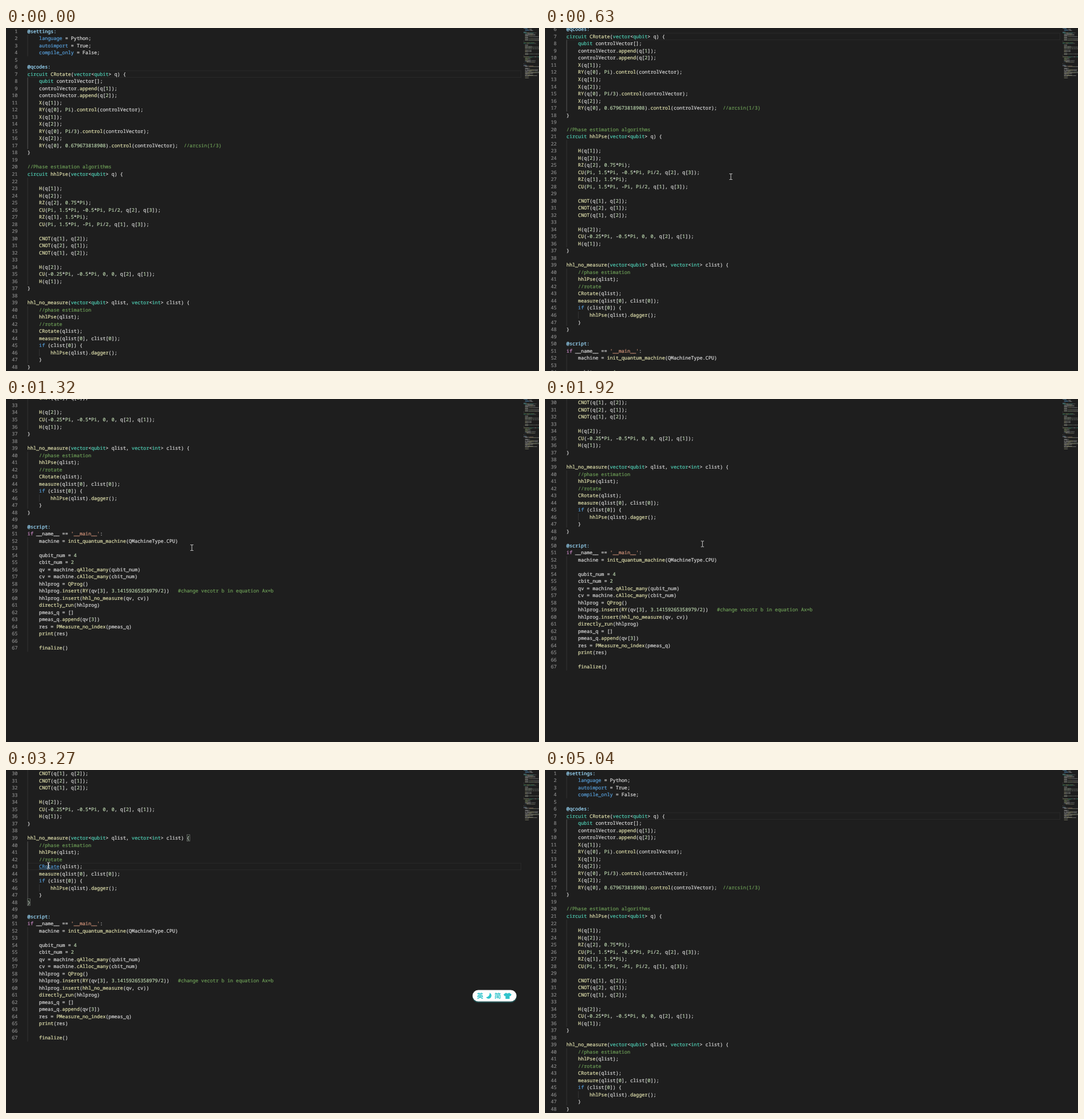
An HTML page that plays this animation: 932x601 px, repeating every 5.1 s.

```html
<!DOCTYPE html>
<html lang="en">
<head>
<meta charset="utf-8">
<title>Quantum code editor</title>
<style>
html, body { margin: 0; width: 100%; height: 100%; overflow: hidden; background: #1e1e1e; }
svg { display: block; width: 932px; height: 601px; }
text { white-space: pre; text-rendering: geometricPrecision; }
.code { font: 8.45px "Noto Sans Mono", monospace; stroke-width: 0.24px; }
.ime { font: bold 11.5px "Noto Sans CJK SC", "Noto Sans CJK", sans-serif; text-anchor: middle; }
</style>
</head>
<body>
<svg id="stage" viewBox="0 0 932 601"></svg>
<script>
const source = `@settings:
    language = Python;
    autoimport = True;
    compile_only = False;

@qcodes:
circuit CRotate(vector<qubit> q) {
    qubit controlVector[];
    controlVector.append(q[1]);
    controlVector.append(q[2]);
    X(q[1]);
    RY(q[0], Pi).control(controlVector);
    X(q[1]);
    X(q[2]);
    RY(q[0], Pi/3).control(controlVector);
    X(q[2]);
    RY(q[0], 0.679673818908).control(controlVector);  //arcsin(1/3)
}

//Phase estimation algorithms
circuit hhlPse(vector<qubit> q) {

    H(q[1]);
    H(q[2]);
    RZ(q[2], 0.75*Pi);
    CU(Pi, 1.5*Pi, -0.5*Pi, Pi/2, q[2], q[3]);
    RZ(q[1], 1.5*Pi);
    CU(Pi, 1.5*Pi, -Pi, Pi/2, q[1], q[3]);

    CNOT(q[1], q[2]);
    CNOT(q[2], q[1]);
    CNOT(q[1], q[2]);

    H(q[2]);
    CU(-0.25*Pi, -0.5*Pi, 0, 0, q[2], q[1]);
    H(q[1]);
}

hhl_no_measure(vector<qubit> qlist, vector<int> clist) {
    //phase estimation
    hhlPse(qlist);
    //rotate
    CRotate(qlist);
    measure(qlist[0], clist[0]);
    if (clist[0]) {
        hhlPse(qlist).dagger();
    }
}

@script:
if __name__ == '__main__':
    machine = init_quantum_machine(QMachineType.CPU)

    qubit_num = 4
    cbit_num = 2
    qv = machine.qAlloc_many(qubit_num)
    cv = machine.cAlloc_many(cbit_num)
    hhlprog = QProg()
    hhlprog.insert(RY(qv[3], 3.14159265358979/2))   #change vecotr b in equation Ax=b
    hhlprog.insert(hhl_no_measure(qv, cv))
    directly_run(hhlprog)
    pmeas_q = []
    pmeas_q.append(qv[3])
    res = PMeasure_no_index(pmeas_q)
    print(res)

    finalize()`.split("\n");

const LOOP = 5100, CHAR = 5.07, ROW = 12.515, LEFT = 37.6;
const NOTCH = ROW * 50 / 19; // one wheel notch: 50 px at a 19 px line height
const NS = "http://www.w3.org/2000/svg";
const stage = document.getElementById("stage");
const rowTop = n => (n - 1) * ROW - 0.6;
const colX = c => LEFT + c * CHAR;

function add(parent, tag, attrs, content) {
  const el = document.createElementNS(NS, tag);
  for (const k in attrs) el.setAttribute(k, attrs[k]);
  if (content !== undefined) el.textContent = content;
  return parent.appendChild(el);
}
const show = (el, on) => el.setAttribute("visibility", on ? "visible" : "hidden");

function ink(el, color) {
  el.setAttribute("fill", color);
  el.setAttribute("stroke", color);
}

// Syntax colours, first match wins
const rules = [
  [/^(\/\/|#).*/, "#6a9955"],
  [/^'[^']*'/, "#ce9178"],
  [/^@\w+:/, "#9cdcfe"],
  [/^(language|autoimport|compile_only)\b/, "#569cd6"],
  [/^(circuit|vector|qubit|int)\b/, "#4ec9b0"],
  [/^if\b/, "#569cd6"],
  [/^\w+(?=\()/, "#dcdcaa"],
  [/^(\d+(\.\d+)?|Pi\b)/, "#b5cea8"],
  [/^(\w+|\s+|.)/, "#d4d4d4"]
];

function tokens(line, n) {
  const list = [];
  for (let at = 0; at < line.length;) {
    const rest = line.slice(at);
    const [re, base] = rules.find(r => r[0].test(rest));
    const text = rest.match(re)[0];
    list.push({ text, at, color: text === "if" && n > 50 ? "#c586c0" : base });
    at += text.length;
  }
  return list;
}

// Editor document
const doc = add(stage, "g", {});
const highlight = add(doc, "rect", { x: LEFT, width: 863, height: ROW - 0.8, fill: "none", stroke: "#2b2b2b", "stroke-width": 0.9 });

function guide(col, from, to, color = "#404040") {
  return add(doc, "rect", { x: colX(col), y: rowTop(from), width: 0.7, height: (to - from + 1) * ROW, fill: color });
}
guide(0, 2, 4);
guide(0, 22, 36);
guide(0, 52, 67);
guide(4, 46, 46);
const guideTop = guide(0, 8, 17);
const guideLow = guide(0, 40, 47);

const brackets = add(doc, "g", { fill: "#1b251b", stroke: "#888", "stroke-width": 0.6 });
for (const [row, col] of [[39, 55], [48, 0]])
  add(brackets, "rect", { x: colX(col), y: rowTop(row) + 0.5, width: CHAR, height: ROW - 1 });

const mini = add(stage, "g", { opacity: 0.55 });
let link;

source.forEach((line, i) => {
  const n = i + 1, y = rowTop(n) + 9.3;
  add(doc, "text", { class: "code", x: 20.4, y, "text-anchor": "end", fill: "#858585", stroke: "#858585" }, n);
  const row = add(doc, "text", { class: "code", x: LEFT, y });
  for (const tk of tokens(line, n)) {
    const span = add(row, "tspan", {}, tk.text);
    ink(span, tk.color);
    if (n === 43 && tk.text === "CRotate") link = span;
    for (const word of tk.text.matchAll(/\S+/g)) {
      const x = 905 + (tk.at + word.index) * 0.66;
      if (x < 932) add(mini, "rect", { x, y: i * 1.317 + 0.2, width: word[0].length * 0.66, height: 0.8, fill: tk.color });
    }
  }
});
const underline = add(doc, "rect", { x: colX(4), y: rowTop(43) + 10.3, width: 7 * CHAR, height: 0.7, fill: "#4e94ce" });
const caret = add(doc, "rect", { width: 0.9, height: ROW - 0.5, fill: "#aeafad" });

// Input method bar
const ime = add(stage, "g", {});
add(ime, "rect", { x: 815.5, y: 387, width: 77.5, height: 20.5, rx: 10.2, fill: "#2cc5cb", opacity: 0.3 });
add(ime, "rect", { x: 815.8, y: 385.6, width: 76.8, height: 19.8, rx: 9.9, fill: "#fff" });
const teal = add(ime, "g", { fill: "#2fc3cb" });
add(teal, "text", { class: "ime", x: 829, y: 399.8 }, "英");
add(teal, "text", { class: "ime", x: 859.7, y: 399.8 }, "简");
add(teal, "path", { d: "M845.6 390.6A5.2 5.2 0 1 1 839.4 398.3A6.6 6.6 0 0 0 845.6 390.6Z" });
add(teal, "path", { d: "M874.4 390.3Q877 392.8 879.6 390.3L884 393.2L882 396.4L880.6 395.8V401H873.4V395.8L872 396.4L870 393.2Z" });

// Mouse pointers
const beam = add(stage, "path", { d: "M-2.6 -5H-.7L0 -4.5L.7 -5H2.6M0 -4.5V4.5M-2.6 5H-.7L0 4.5L.7 5H2.6", fill: "none", stroke: "#e4e4e4", "stroke-width": 0.9 });
const hand = add(stage, "path", { d: "M-1.4 -5.5Q-.5 -7 .4 -5.5V-1.8L3.6 -1Q5 -.6 4.8 1L4 4.5V6.6H-1.6V5L-4.8 1.2Q-4.6 -.3 -3.2 .4L-1.4 1.8Z", fill: "#fff", stroke: "#222", "stroke-width": 0.5 });

// start, end, from, bend, to
const moves = [
  [60, 580, 940, 150, 560, 230, 325, 260.5],
  [1530, 1710, 325, 260.5, 300, 261, 278.5, 260],
  [1890, 2310, 278.5, 255, 170, 220, 87, 177],
  [2310, 2430, 87, 177, 105, 178, 120, 181],
  [2430, 2610, 120, 181, 95, 178, 78.5, 171.5],
  [2790, 3240, 78.5, 171.5, 78, 168, 74.5, 167],
  [3660, 4200, 74.5, 167, 270, 230, 532, 167],
  [4200, 4570, 532, 167, 720, 150, 940, 120]
];
// time, wheel notches from the top
const scrolls = [
  [0, 0], [600, 1], [630, 2], [660, 3], [690, 4],
  [930, 5], [960, 7], [990, 8],
  [1230, 9], [1260, 11], [1320, 12], [1410, 11], [3300, 0]
];

function mouseAt(t) {
  let m = moves[0];
  for (const next of moves) if (t >= next[0]) m = next;
  const [a, b, x0, y0, cx, cy, x1, y1] = m;
  const p = Math.min(1, Math.max(0, (t - a) / (b - a)));
  const u = p * p * (3 - 2 * p), v = 1 - u;
  const curve = (s, c, e) => v * v * s + 2 * u * v * c + u * u * e;
  return [curve(x0, cx, x1), curve(y0, cy, y1)];
}

function draw(time) {
  const t = Math.floor((time % LOOP) / 30) * 30;
  const between = (a, b) => t >= a && t < b;

  let notches = 0;
  for (const [at, count] of scrolls) if (t >= at) notches = count;
  doc.setAttribute("transform", `translate(0 ${-notches * NOTCH})`);

  const clicked = between(3000, 3300);
  const active = clicked ? 43 : 7;
  highlight.setAttribute("y", rowTop(active) + 0.4);

  const lowBlock = between(3000, 3330);
  show(brackets, lowBlock);
  guideLow.setAttribute("fill", lowBlock ? "#707070" : "#404040");
  guideTop.setAttribute("fill", clicked ? "#404040" : "#707070");

  const linked = between(2550, 3300);
  ink(link, linked ? "#4e94ce" : "#dcdcaa");
  show(underline, linked);

  caret.setAttribute("x", colX(clicked ? 7 : 0));
  caret.setAttribute("y", rowTop(active));
  show(caret, clicked || between(3870, 4380) || between(4890, 5040));
  show(ime, between(2850, 5040));

  const [x, y] = mouseAt(t);
  const pointing = between(2550, 3090);
  const visible = between(90, 4590);
  for (const el of [beam, hand]) el.setAttribute("transform", `translate(${x} ${y})`);
  show(hand, visible && pointing);
  show(beam, visible && !pointing);
}

const start = performance.now();
function tick() {
  draw(performance.now() - start);
  requestAnimationFrame(tick);
}
tick();
</script>
</body>
</html>
```
